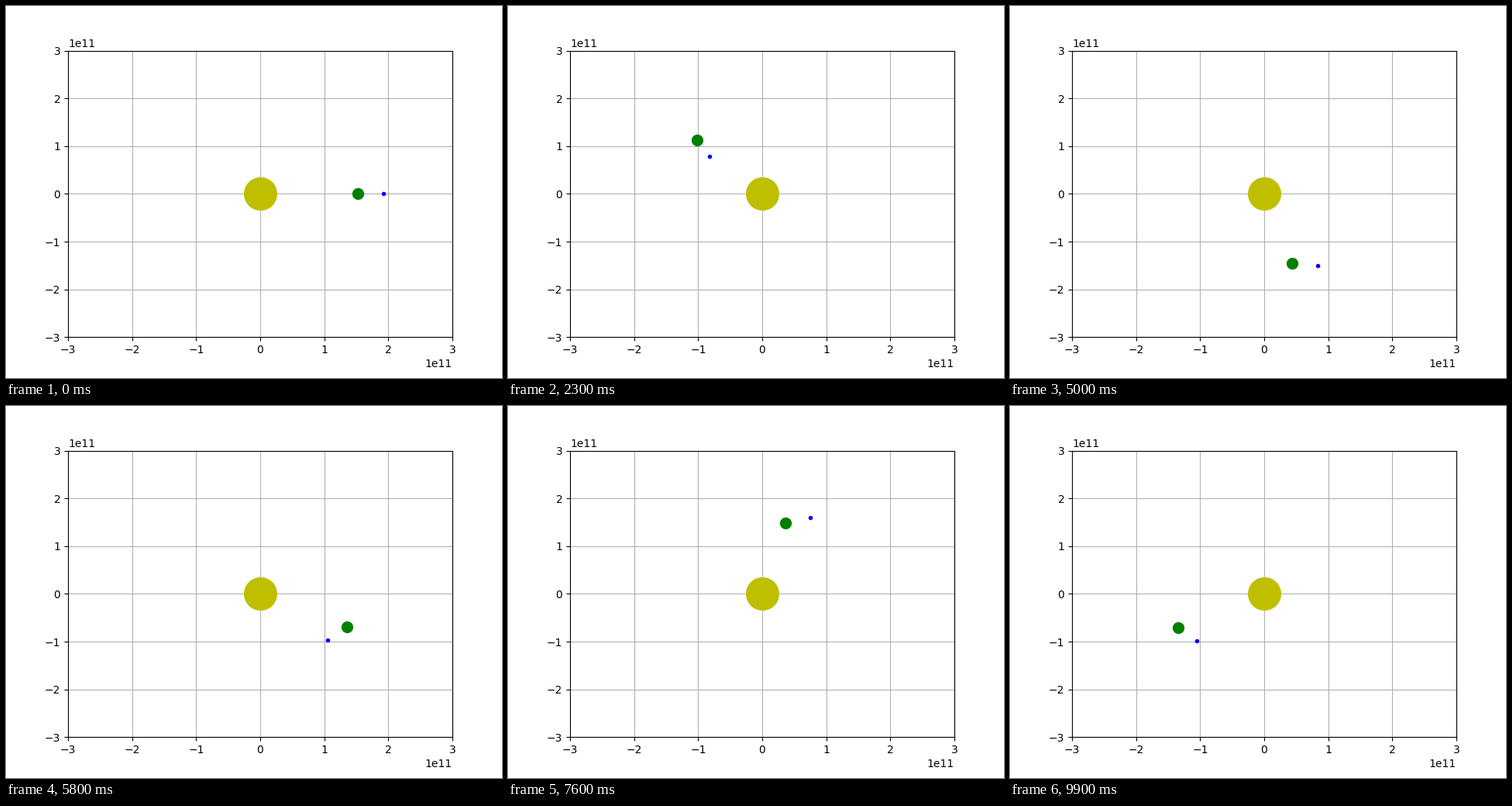
A matplotlib script that plays this animation: 640x480 px, repeating every 10000 ms.

```python
import numpy as np
import matplotlib.pyplot as plt
from matplotlib.animation import FuncAnimation

FRAMES = 100
INTERVAL = 100

ORBIT = 1.5202e11      # semi-major axis of the planet's path
ECC = 0.001
RATE = 0.100145        # mean planet angle per frame
MOON_ORBIT = 0.4e11    # enlarged so the moon is visible
MOON_RATE = 0.5
LIMIT = 3e11


def polar(r, angle):
    return np.array([r * np.cos(angle), r * np.sin(angle)])


def planet_pos(i):
    mean = RATE * i
    angle = mean + 2 * ECC * np.sin(mean)
    return polar(ORBIT * (1 - ECC * np.cos(angle)), angle)


def moon_pos(i):
    return planet_pos(i) + polar(MOON_ORBIT, MOON_RATE * i)


fig, ax = plt.subplots(figsize=(6.4, 4.8), dpi=100)
ax.set_xlim(-LIMIT, LIMIT)
ax.set_ylim(-LIMIT, LIMIT)
ax.grid(True)


def body(color, size):
    return ax.plot([0], [0], color + "o", markersize=size)[0]


sun = body("y", 30)
planet = body("g", 10)
moon = body("b", 3)


def update(i):
    for dot, (x, y) in ((planet, planet_pos(i)), (moon, moon_pos(i))):
        dot.set_data([x], [y])
    return planet, moon


anim = FuncAnimation(fig, update, frames=FRAMES, interval=INTERVAL,
                     repeat=True, repeat_delay=0, blit=False)
plt.show()
```
